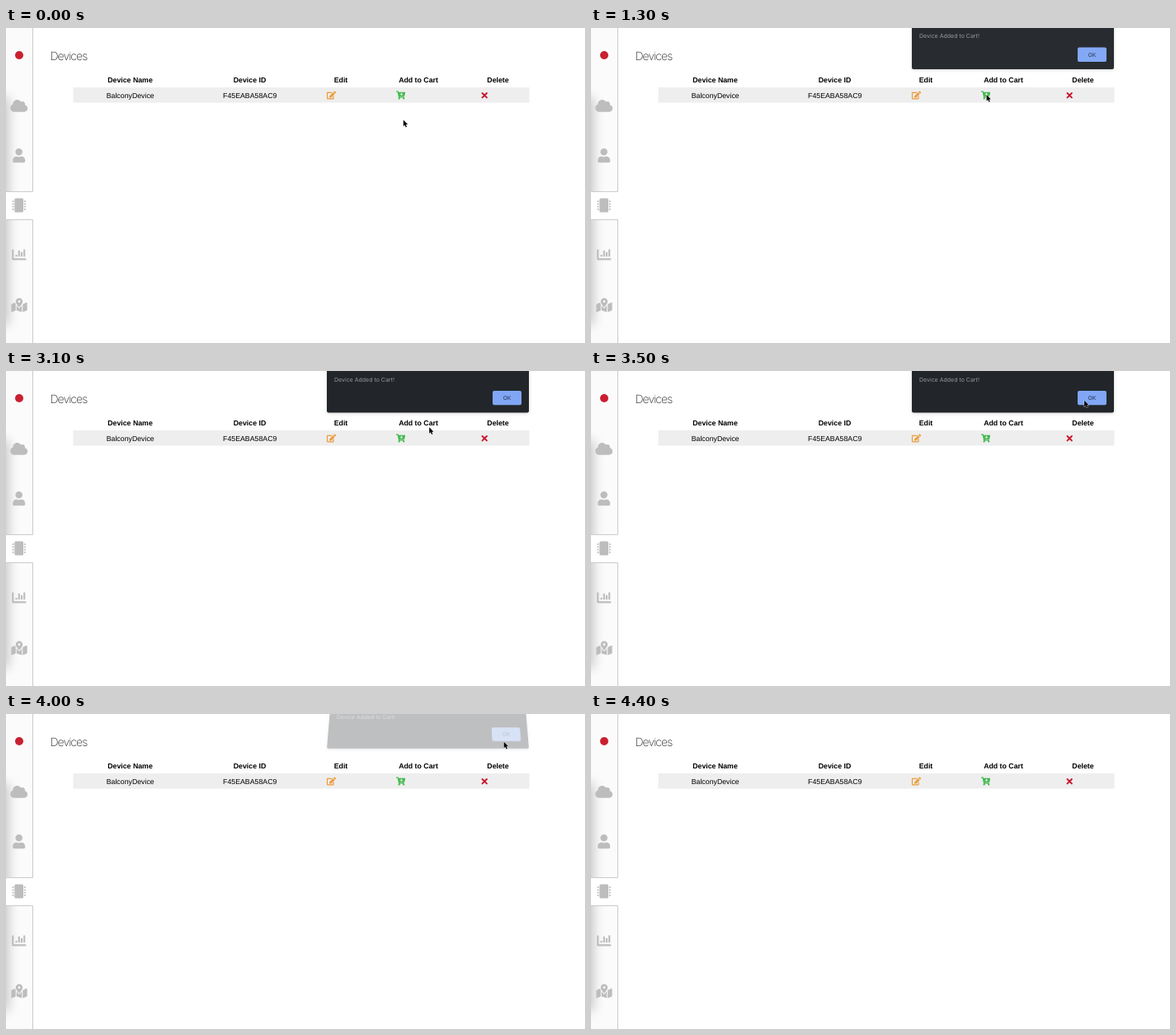
An HTML page that plays this animation: 702 by 382 pixels, repeating every 5.2 s.

```html
<!DOCTYPE html>
<html lang="en">
<head>
<meta charset="utf-8">
<title>Devices</title>
<style>
  html, body { margin: 0; width: 100%; height: 100%; overflow: hidden; background: #fff; }
  svg { position: absolute; left: 0; top: 0; display: block; overflow: hidden; }
  text { text-rendering: geometricPrecision; }
  .table { font: 8.78px "Liberation Sans", Arial, sans-serif; text-anchor: middle; }
  .head { font-weight: bold; }
  .title { font: 200 14px Inter, Roboto, sans-serif; letter-spacing: -0.95px; fill: #222; }
  .ui { font: 7px Inter, Roboto, sans-serif; }
  #dialog { transform-origin: 511.5px 50.5px; }
</style>
</head>
<body>
<svg width="702" height="382" viewBox="0 0 702 382">
  <defs>
    <filter id="soft" x="-200%" y="-20%" width="500%" height="140%">
      <feGaussianBlur stdDeviation="7"/>
    </filter>
    <clipPath id="side"><path d="M0 0H32V198H0zM0 233H32V382H0z"/></clipPath>
  </defs>
  <g clip-path="url(#side)">
    <rect width="32" height="382" fill="#fbfbfb"/>
    <rect x="-14" y="84" width="17" height="276" fill="#c4c4c4" filter="url(#soft)"/>
  </g>
  <path d="M32.5 0V198.5H0M0 232.5H32.5V382" fill="none" stroke="#cbcbcb"/>
  <circle cx="16" cy="33" r="5" fill="#c9202f"/>
  <g id="nav" fill="#bdbdbd"></g>

  <text class="title" x="53.5" y="39">Devices</text>
  <rect x="81.5" y="72" width="553" height="18.5" fill="#eee"/>
  <g id="table" class="table"></g>
  <path d="M577.5 79l5.4 5.4m0-5.4l-5.4 5.4" stroke="#c8152d" stroke-width="1.9" stroke-linecap="round"/>
</svg>

<svg id="dialog" width="702" height="382" viewBox="0 0 702 382" style="overflow: visible">
  <defs>
    <filter id="shade" x="-10%" y="-10%" width="120%" height="125%">
      <feDropShadow dx="0" dy="1" stdDeviation="2" flood-opacity=".16"/>
    </filter>
  </defs>
  <rect x="389" y="-30" width="245" height="80.5" rx="2" fill="#242629" filter="url(#shade)"/>
  <text class="ui" x="398" y="12.6" fill="#96979a">Device Added to Cart!</text>
  <rect id="button" x="590" y="24" width="35" height="17.3" rx="2"/>
  <text class="ui" x="607.5" y="35.1" text-anchor="middle" font-weight="500" style="font-size: 6.6px" fill="#25304a">OK</text>
</svg>

<svg width="702" height="382" viewBox="0 0 702 382">
  <path id="cursor" d="M0 0V7.6L1.7 6L2.9 8.8L4.2 8.2L3 5.5H5.3Z" fill="#000" stroke="#fff" stroke-width=".7" paint-order="stroke"/>
</svg>

<script>
const NS = "http://www.w3.org/2000/svg";
const $ = id => document.getElementById(id);

function add(parent, tag, attrs, text) {
  const node = document.createElementNS(NS, tag);
  for (const key in attrs) node.setAttribute(key, attrs[key]);
  if (text) node.textContent = text;
  parent.append(node);
  return node;
}

// Icons are drawn on a 512-unit-high grid and centred on (x, y).
function icon(parent, d, width, x, y, scale, fill) {
  const attrs = {
    d, "fill-rule": "evenodd",
    transform: `translate(${x} ${y}) scale(${scale}) translate(${-width / 2} -256)`
  };
  if (fill) attrs.fill = fill;
  add(parent, "path", attrs);
}

const bar = (x, y, w, h) => `M${x} ${y}h${w}v${h}h${-w}z`;

const cloud = "M538 227c4-11 6-23 6-35 0-53-43-96-96-96-20 0-38 6-53 16C367 64 315 32 256 32c-88 0-160 72-160 160v8C40 220 0 273 0 336c0 80 65 144 144 144h368c71 0 128-57 128-128 0-62-44-114-102-125z";
const user = "M224 256c71 0 128-57 128-128S295 0 224 0 96 57 96 128s57 128 128 128zm90 32h-17c-22 10-47 16-73 16s-51-6-73-16h-17C60 288 0 348 0 422V464c0 27 21 48 48 48h352c27 0 48-21 48-48v-42c0-74-60-134-134-134z";
const chip = "M144 0H368a48 48 0 0 1 48 48V464a48 48 0 0 1-48 48H144a48 48 0 0 1-48-48V48a48 48 0 0 1 48-48z" +
  [88, 184, 280, 376].map(y => bar(440, y, 48, 48) + bar(488, y + 12, 24, 24) +
    bar(24, y, 48, 48) + bar(0, y + 12, 24, 24)).join("");
const chart = "M496 384H64V80c0-9-7-16-16-16H16C7 64 0 71 0 80v336c0 18 14 32 32 32h464c9 0 16-7 16-16v-32c0-9-7-16-16-16z" +
  bar(128, 256, 64, 64) + bar(224, 96, 64, 224) + bar(320, 160, 64, 160) + bar(416, 64, 64, 256);
const map = "M288 0c-70 0-126 56-126 126 0 56 82 159 114 196 6 8 18 8 24 0C332 285 414 182 414 126 414 56 358 0 288 0zm0 168a42 42 0 1 1 0-84 42 42 0 0 1 0 84z" +
  "M20 216A32 32 0 0 0 0 246V496c0 11 11 19 22 15L160 448V215c-9-16-16-32-21-46z" +
  "M288 360c-14 0-27-6-37-17-19-23-40-50-59-77v182l192 64V266c-19 27-40 54-59 77-10 11-23 17-37 17z" +
  "M554 161L416 224v288l140-56A32 32 0 0 0 576 426V176c0-11-11-19-22-15z";
const edit = "M403 83l90 90c4 4 4 10 0 14L274 406l-92 10c-13 1-23-9-22-22l10-92L389 83c4-4 10-4 14 0z" +
  "M565 60l-49-48c-15-16-40-16-55 0l-36 35c-4 4-4 10 0 14l90 90c4 4 10 4 14 0l36-35c15-16 15-41 0-56z" +
  "M384 346V448H64V128h230c3 0 6-1 8-4l40-40c8-7 3-20-8-20H48C21 64 0 85 0 112v352c0 27 21 48 48 48h352c27 0 48-21 48-48V306c0-10-13-16-20-8l-40 40c-3 2-4 5-4 8z";
const cart = "M505 320H212l6 32h269c15 0 26 14 23 29l-6 25a56 56 0 1 1-63 10H231a57 57 0 1 1-67-9L94 64H24C11 64 0 53 0 40V24C0 11 11 0 24 0h103c11 0 21 8 23 19l9 45H552c15 0 27 14 23 29l-47 208c-2 11-12 19-23 19z" +
  "M312 112h48v56h64v48h-64v56h-48v-56h-64v-48h64z";

const nav = $("nav"), table = $("table");
icon(nav, cloud, 640, 15.7, 94.3, .0328);
icon(nav, user, 448, 15.7, 154.6, .0335);
icon(nav, chip, 512, 15.7, 215, .0335);
icon(nav, chart, 512, 15.8, 275, .0335);
icon(nav, map, 576, 16, 336, .0335);
icon(table, edit, 576, 394.5, 81.5, .0195, "#eb9c3c");
icon(table, cart, 576, 478.5, 81.5, .0195, "#3fb84b");

const columns = [["Device Name", 150.5], ["Device ID", 295.5], ["Edit", 406], ["Add to Cart", 500], ["Delete", 596.5]];
for (const [label, x] of columns) add(table, "text", { x, y: 66, class: "head" }, label);
add(table, "text", { x: 150.7, y: 84.7 }, "BalconyDevice");
add(table, "text", { x: 295.7, y: 84.7 }, "F45EABA58AC9");

const LOOP = 5200, STEP = 100;
const clamp = v => Math.min(1, Math.max(0, v));
const mix = (a, b, p) => a + (b - a) * p;

function cursorAt(t) {
  if (t < 3100) {
    const p = clamp(t / 600), e = p * p * (3 - 2 * p);
    return [mix(481.8, 479.6, e) + 4 * Math.sin(Math.PI * e), mix(111.6, 81, e)];
  }
  const e = 1 - (1 - clamp((t - 3000) / 600)) ** 1.73;
  return [mix(479.6, 603.7, e), mix(81, 33.7, e)];
}

function drawDialog(t) {
  const dialog = $("dialog");
  const open = t >= 1300 && t < 4200;
  dialog.style.display = open ? "" : "none";
  if (!open) return;
  let opacity = 1, move = "none";
  if (t < 1400) {
    opacity = .97;
    move = "translateY(-.4px)";
  } else if (t >= 4000) {
    const k = (t - 3900) / STEP;
    opacity = k > 1 ? .04 : .3;
    move = `translateY(${-8.5 * k}px) perspective(260px) rotateX(${10 * k}deg)`;
  }
  dialog.style.opacity = opacity;
  dialog.style.transform = move;
  $("button").setAttribute("fill", t >= 3800 ? "#7b9de4" : "#80a6f5");
}

function draw(now) {
  const t = Math.floor((now % LOOP) / STEP) * STEP;
  const [x, y] = cursorAt(t);
  const cursor = $("cursor");
  cursor.setAttribute("transform", `translate(${x} ${y})`);
  cursor.style.display = t < 4300 ? "" : "none";
  drawDialog(t);
}

const start = performance.now();
function tick() {
  draw(performance.now() - start);
  requestAnimationFrame(tick);
}
tick();
</script>
</body>
</html>
```
